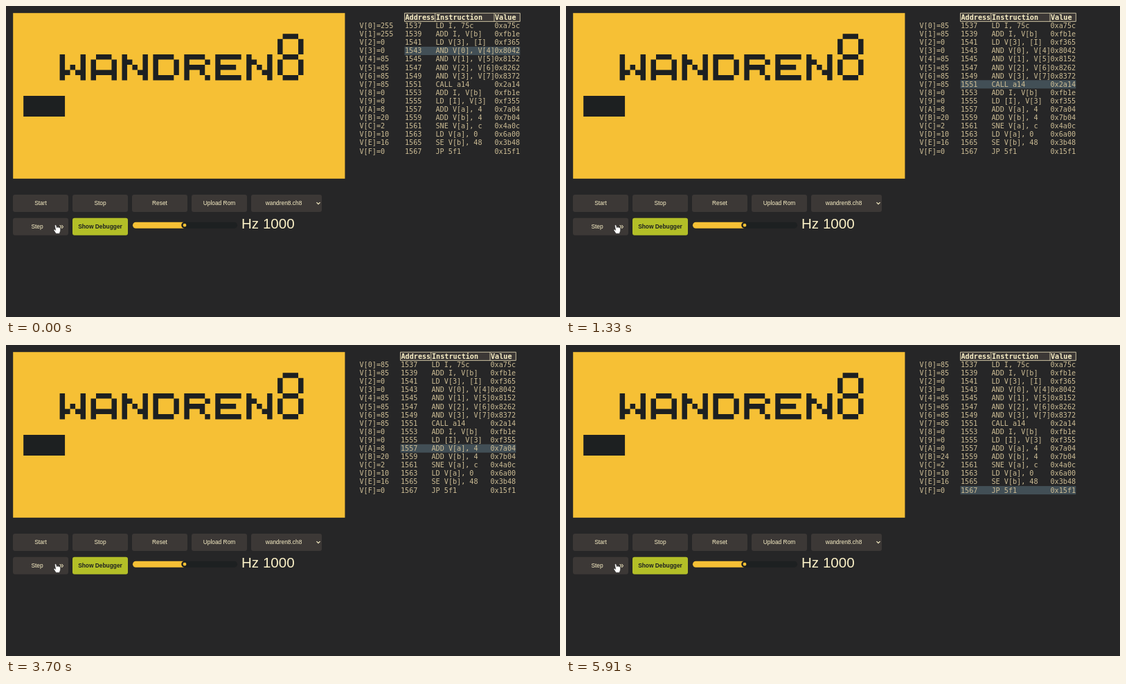
An HTML page for the animation above (5.94 s loop, 800x450 px).

```html
<!DOCTYPE html>
<html lang="en">
<head>
<meta charset="utf-8">
<title>Emulator debugger</title>
<style>
  html, body { margin: 0; width: 100%; height: 100%; overflow: hidden; background: #262627; }
  svg { display: block; width: 800px; height: 450px; }
  text { white-space: pre; }
  .ui { font: 8.4px "Liberation Sans", Arial, sans-serif; fill: #fbf1c7; text-anchor: middle; }
  .mono { font: 10.13px "DejaVu Sans Mono", monospace; fill: #cdbd95; }
  .head { font-weight: bold; fill: #fbf1c7; }
  .hz { font: 20.6px "Liberation Sans", Arial, sans-serif; fill: #fbf1c7; }
</style>
</head>
<body>
<svg viewBox="0 0 800 450">
  <g id="stage"></g>
  <g id="debug"></g>
</svg>
<script>
const LOOP = 5940, ROW = 12.1;
const YELLOW = '#f6c035', DARK = '#1d2021', BUTTON = '#3c3836';

const rect = (x, y, w, h, fill, extra = '') =>
  `<rect x="${x}" y="${y}" width="${w}" height="${h}" fill="${fill}" ${extra}/>`;
const text = (x, y, s, cls, extra = '') => `<text x="${x}" y="${y}" class="${cls}" ${extra}>${s}</text>`;
const button = (x, y, w, label, tx = x + w / 2, fill = BUTTON, extra = '') =>
  rect(x, y, w, 25, fill, 'rx="3"') + text(tx, y + 15.3, label, 'ui', extra);

// Emulated 64 x 32 display
const GLYPHS = {
  W: 'X...X X...X X.X.X XX.XX X...X',
  A: '.XXX. X...X X...X XXXXX X...X',
  N: 'X...X XX..X X.X.X X..XX X...X',
  D: 'XXXX. X...X X...X X...X XXXX.',
  R: 'XXXX. X...X XXXX. X..X. X...X',
  E: 'XXXXX X.... XXXX. X.... XXXXX',
  8: '.XXX. X...X X...X X...X .XXX. X...X X...X X...X .XXX.'
};

function display() {
  let path = '';
  [...'WANDREN8'].forEach((ch, i) => {
    const rows = GLYPHS[ch].split(' ');
    rows.forEach((row, r) => [...row].forEach((bit, c) => {
      if (bit === 'X') path += `M${9 + 6 * i + c} ${13 - rows.length + r}h1v1h-1z`;
    }));
  });
  path += 'M2 16h8v4h-8z';
  return `<g transform="translate(10.2 10.2) scale(7.488)">${rect(0, 0, 64, 32, YELLOW)}` +
    `<path d="${path}" fill="${DARK}"/></g>`;
}

function controls() {
  const cursor = 'M70.4 317.2q1.4-1 2.2.5l1 3.2.3-.9q1.1-.5 1.7.5 1-.6 1.7.5 1.2-.2 1.4 1l-.2 3.4-1.3 3.9h-5l-3.1-4.8q-.3-1.4 1.3-1.1l1.3 1.1z';
  return ['Start', 'Stop', 'Reset', 'Upload Rom'].map((s, i) => button(10 + 86 * i, 273, 80, s)).join('') +
    button(354, 273, 102, 'wandren8.ch8', 401) +
    '<path d="M448.5 284.2l2.5 2.5 2.5-2.5" fill="none" stroke="#fbf1c7" stroke-width="1.2"/>' +
    button(10, 306.7, 80, 'Step', 45) +
    text(80, 323.4, '»', 'ui', 'style="font-size:12px"') +
    button(96, 306.7, 80, 'Show Debugger', 136, '#b3bf27', 'style="font-weight:bold;fill:#1d2021"') +
    rect(183, 312.7, 151, 9, DARK, 'rx="4.5"') +
    rect(183, 312.7, 77, 9, YELLOW, 'rx="4.5"') +
    `<circle cx="258" cy="317.2" r="3.6" fill="${YELLOW}" stroke="${DARK}" stroke-width="2.4"/>` +
    text(340, 322.3, 'Hz 1000', 'hz') +
    `<path d="${cursor}" fill="#fff" stroke="#222" stroke-width=".5"/>`;
}

const listing = (start, src) => ({ start, rows: src.split('|').map(s => s.split('=')) });
const MAIN = listing(1537, 'LD I, 75c=0xa75c|ADD I, V[b]=0xfb1e|LD V[3], [I]=0xf365|' +
  'AND V[0], V[4]=0x8042|AND V[1], V[5]=0x8152|AND V[2], V[6]=0x8262|AND V[3], V[7]=0x8372|' +
  'CALL a14=0x2a14|ADD I, V[b]=0xfb1e|LD [I], V[3]=0xf355|ADD V[a], 4=0x7a04|ADD V[b], 4=0x7b04|' +
  'SNE V[a], c=0x4a0c|LD V[a], 0=0x6a00|SE V[b], 48=0x3b48|JP 5f1=0x15f1');
const SUB = listing(2560, 'JP d05=0x1d05|SYS 553=0x553|SE V[2], fe=0x32fe|JP d25=0x1d25|' +
  'SNE V[6], 53=0x4653|JP 436=0x1436|JP dff=0x1dff|SYS 1=0x01|LD I, 7ac=0xa7ac|RET=0xee|' +
  'LD I, a6e=0xaa6e|RET=0xee|LD V[0], V[4]=0x8040|CALL 10=0x2010|=0x5555|=0x5555');

const REGS = [255, 255, 0, 0, 85, 85, 85, 85, 0, 0, 8, 20, 2, 10, 16, 0];
// Each click: time, next address, then register and its new value if one changes
const STEPS = [
  [0, 1543], [240, 1545, 0, 85], [640, 1547, 1, 85], [970, 1549], [1300, 1551],
  [1720, 2580], [2120, 2582], [2520, 1553], [2960, 1555], [3480, 1557],
  [3970, 1559, 10, 12], [4420, 1561, 11, 24], [4940, 1563], [5400, 1565, 10, 0], [5820, 1567]
];

function debuggerView(n) {
  const regs = [...REGS];
  for (const [, , reg, value] of STEPS.slice(0, n + 1)) if (reg !== undefined) regs[reg] = value;
  const pc = STEPS[n][1], code = pc < 2000 ? MAIN : SUB;
  const x = regs[1] > 99 ? 576 : 570, xi = x + 44.5;
  const xv = xi + (code === MAIN ? 85 : 78.7), right = xv + 36.8;
  const active = (pc - code.start) / 2;

  let out = rect(x - .5, 22.6 + ROW * active, right - x + .5, ROW, '#424f56');
  out += `<path d="M${x - .5} 10.3H${right}V22.4H${x - .5}zM${xi - .8} 10.3v12.1M${xv - .5} 10.3v12.1" ` +
    `fill="${BUTTON}" stroke="#d9cfac" stroke-width=".9"/>`;
  [[x, 'Address'], [xi, 'Instruction'], [xv, 'Value']].forEach(([hx, s]) => {
    out += text(hx + .5, 19.6, s, 'mono head');
  });
  code.rows.forEach(([op, value], i) => {
    const y = 32 + ROW * i;
    out += text(510.5, y, `V[${i.toString(16).toUpperCase()}]=${regs[i]}`, 'mono') +
      text(x, y, code.start + 2 * i, 'mono') + text(xi, y, op, 'mono') + text(xv, y, value, 'mono');
  });
  return out;
}

document.getElementById('stage').innerHTML = display() + controls();
const debug = document.getElementById('debug');
let shown = -1;

function frame() {
  const t = performance.now() % LOOP;
  const n = STEPS.filter(s => s[0] <= t).length - 1;
  if (n !== shown) debug.innerHTML = debuggerView(shown = n);
  requestAnimationFrame(frame);
}
frame();
</script>
</body>
</html>
```
